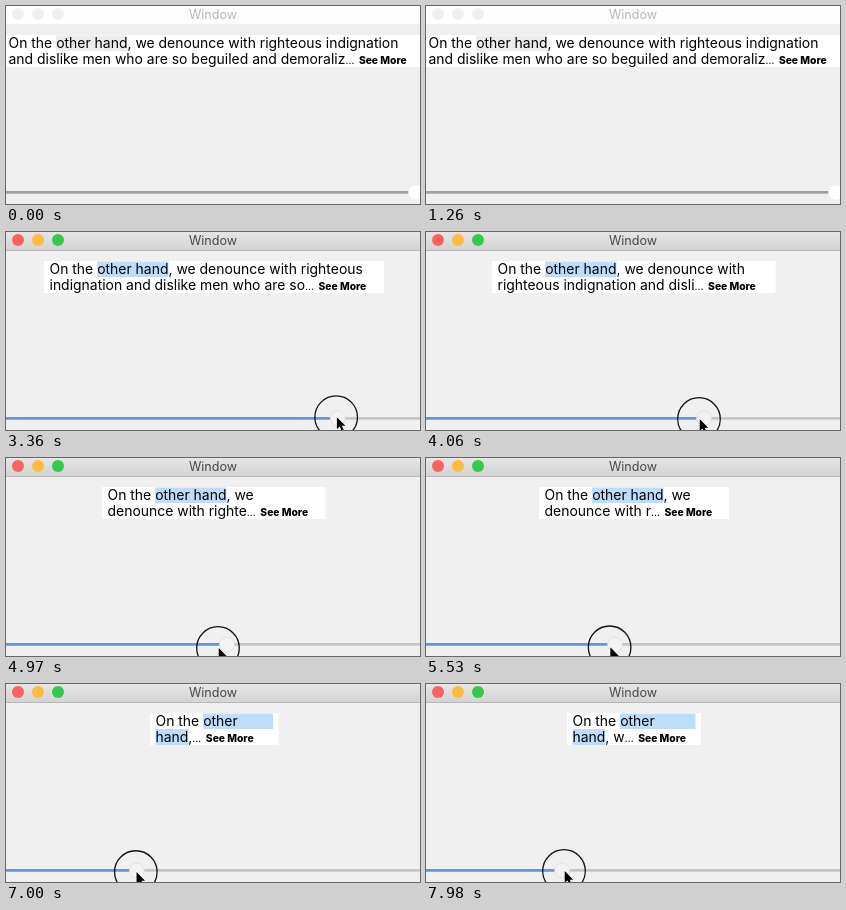
An HTML page with a canvas for the animation above (8000 ms loop, 414 px wide and 198 px high).

```html
<!DOCTYPE html>
<html lang="en">
<head>
<meta charset="utf-8">
<title>Window</title>
<style>
  html, body { margin: 0; width: 100%; height: 100%; overflow: hidden; background: #f0f0f0; }
  canvas { display: block; width: 414px; height: 198px; }
</style>
</head>
<body>
<canvas></canvas>
<script>
const WIDTH = 414, HEIGHT = 198, LOOP = 8000, STEP = 70;
const ENTER = 1260, PRESS = 2100, PALE_FROM = 6020, PALE_TO = 6370;
const TRACK_TOP = 185, TRACK_HEIGHT = 2.7, KNOB_Y = 186.5;
const BOX_TOP = 29, LINE = 16, BOX_CENTER = 208;
const BODY_FONT = '13.95px Inter, "Open Sans", sans-serif';
const DOTS_FONT = '10.3px Inter, "Open Sans", sans-serif';
const MORE_FONT = '800 10.3px Inter, "Open Sans", sans-serif';
const TITLE_FONT = '12.6px Inter, "Open Sans", sans-serif';
const WORDS = ('On the other hand, we denounce with righteous indignation ' +
  'and dislike men who are so beguiled and demoralized by the charms').split(' ');

// time, knob x, pointer x, pointer y
const DRAG = [
  [1260, 410, 414, 197], [1610, 410, 409, 186], [2380, 410, 408, 185],
  [2730, 381, 378, 184], [2870, 369, 371, 184], [3710, 305, 301, 186],
  [4060, 278, 273, 187], [4550, 237, 230, 189], [4970, 221, 212, 190],
  [6160, 153, 151.7, 188.5], [7070, 129, 128, 188], [7490, 117, 118, 188],
  [7910, 130, 130, 187], [7980, 136, 138, 187]
];

const canvas = document.querySelector('canvas');
const ctx = canvas.getContext('2d');
const ratio = window.devicePixelRatio || 1;
canvas.width = WIDTH * ratio;
canvas.height = HEIGHT * ratio;
ctx.scale(ratio, ratio);

function rect(x, y, w, h, fill) {
  ctx.fillStyle = fill;
  ctx.fillRect(x, y, w, h);
}

function circle(x, y, r, fill, stroke, lineWidth = 1) {
  ctx.beginPath();
  ctx.arc(x, y, r, 0, Math.PI * 2);
  if (fill) { ctx.fillStyle = fill; ctx.fill(); }
  if (stroke) { ctx.strokeStyle = stroke; ctx.lineWidth = lineWidth; ctx.stroke(); }
}

function text(string, x, y, font, fill = '#000') {
  ctx.font = font;
  ctx.fillStyle = fill;
  ctx.fillText(string, x, y);
}

function measure(string, font = BODY_FONT) {
  ctx.font = font;
  return ctx.measureText(string).width;
}

function dragAt(t) {
  if (t <= DRAG[0][0]) return DRAG[0].slice(1);
  const next = DRAG.findIndex(key => key[0] >= t);
  if (next < 0) return DRAG[DRAG.length - 1].slice(1);
  const a = DRAG[next - 1], b = DRAG[next];
  const p = (t - a[0]) / (b[0] - a[0]);
  return [1, 2, 3].map(i => a[i] + (b[i] - a[i]) * p);
}

function drawTitleBar(active, pale) {
  if (active) {
    const shade = ctx.createLinearGradient(0, 0, 0, 18);
    shade.addColorStop(0, '#e6e6e6');
    shade.addColorStop(1, '#d3d3d3');
    rect(0, 0, WIDTH, 18, shade);
    rect(0, 18, WIDTH, 1, '#b8b8b8');
  } else {
    rect(0, 0, WIDTH, 18, '#fdfdfd');
  }
  const lights = active ? ['#fc625d', '#fdbc40', '#35c84a'] : Array(3).fill('#efefef');
  lights.forEach((color, i) => circle(12 + i * 20, 8, 6, color));
  if (pale) rect(0, 0, WIDTH, 18, 'rgba(240, 240, 240, 0.25)');
  ctx.textAlign = 'center';
  text('Window', 207, 13, TITLE_FONT, active ? '#484848' : '#b8b8b8');
  ctx.textAlign = 'left';
}

function drawParagraph(knob, selectionColor) {
  const boxWidth = 134 + (knob - 136) * 1.053;
  const left = Math.round(BOX_CENTER - boxWidth / 2);
  const x = left + 5.5;
  const inner = boxWidth - 12;
  rect(left, BOX_TOP, boxWidth, LINE * 2, '#fff');

  let count = 1;
  while (measure(WORDS.slice(0, count + 1).join(' ')) <= inner) count++;
  const first = WORDS.slice(0, count);
  const rest = WORDS.slice(count).join(' ');

  const moreOffset = 13.5, moreWidth = measure('See More', MORE_FONT);
  const room = boxWidth - 19.8 - moreOffset - moreWidth;
  let length = rest.length;
  while (length && measure(rest.slice(0, length)) > room) length--;
  const second = rest.slice(0, length).trimEnd();

  // The selection runs to the line end when it wraps.
  const start = measure('On the ');
  if (first.includes('hand,')) {
    rect(x + start, BOX_TOP + 0.5, measure('other hand'), LINE - 0.5, selectionColor);
  } else {
    rect(x + start, BOX_TOP + 0.5, inner + 1 - start, LINE - 0.5, selectionColor);
    rect(x, BOX_TOP + LINE, measure('hand'), LINE, selectionColor);
  }

  const baseline = BOX_TOP + 13;
  text(first.join(' '), x, baseline, BODY_FONT);
  text(second, x, baseline + LINE, BODY_FONT);
  const end = x + measure(second);
  text('…', end, baseline + LINE, DOTS_FONT);
  text('See More', end + moreOffset, baseline + LINE, MORE_FONT);
}

function drawSlider(knob, active) {
  rect(0, TRACK_TOP, WIDTH, TRACK_HEIGHT, active ? '#c4c6c6' : '#9e9e9e');
  if (active) rect(0, TRACK_TOP, knob, TRACK_HEIGHT, '#6797da');
  circle(knob, KNOB_Y, 7.5, active ? '#f3f3f3' : '#fff', active ? '#dadada' : '#f4f4f4', 0.7);
}

function drawPointer(x, y, pressed) {
  if (pressed) circle(x, y, 21.3, null, '#111', 1.3);
  const arrow = new Path2D('M0 0V12L2.8 9.4L4.7 13.6L6.8 12.7L5 8.7H8.6Z');
  ctx.save();
  ctx.translate(x + 0.7, y);
  ctx.lineWidth = 1.4;
  ctx.strokeStyle = '#fff';
  ctx.stroke(arrow);
  ctx.fillStyle = '#000';
  ctx.fill(arrow);
  ctx.restore();
}

function draw(t) {
  const active = t >= PRESS;
  const pale = t >= PALE_FROM && t < PALE_TO;
  const [knob, pointerX, pointerY] = dragAt(t);
  const selection = !active ? '#ececec' : pale ? '#dfebfb' : '#c0dcfb';
  rect(0, 0, WIDTH, HEIGHT, active ? '#f0f0f0' : '#efefef');
  drawTitleBar(active, pale);
  drawParagraph(knob, selection);
  drawSlider(knob, active);
  if (t > ENTER) drawPointer(pointerX, pointerY, active);
}

const origin = performance.now();
function tick() {
  const t = (performance.now() - origin) % LOOP;
  draw(Math.floor(t / STEP) * STEP);
  requestAnimationFrame(tick);
}
tick();
</script>
</body>
</html>
```
